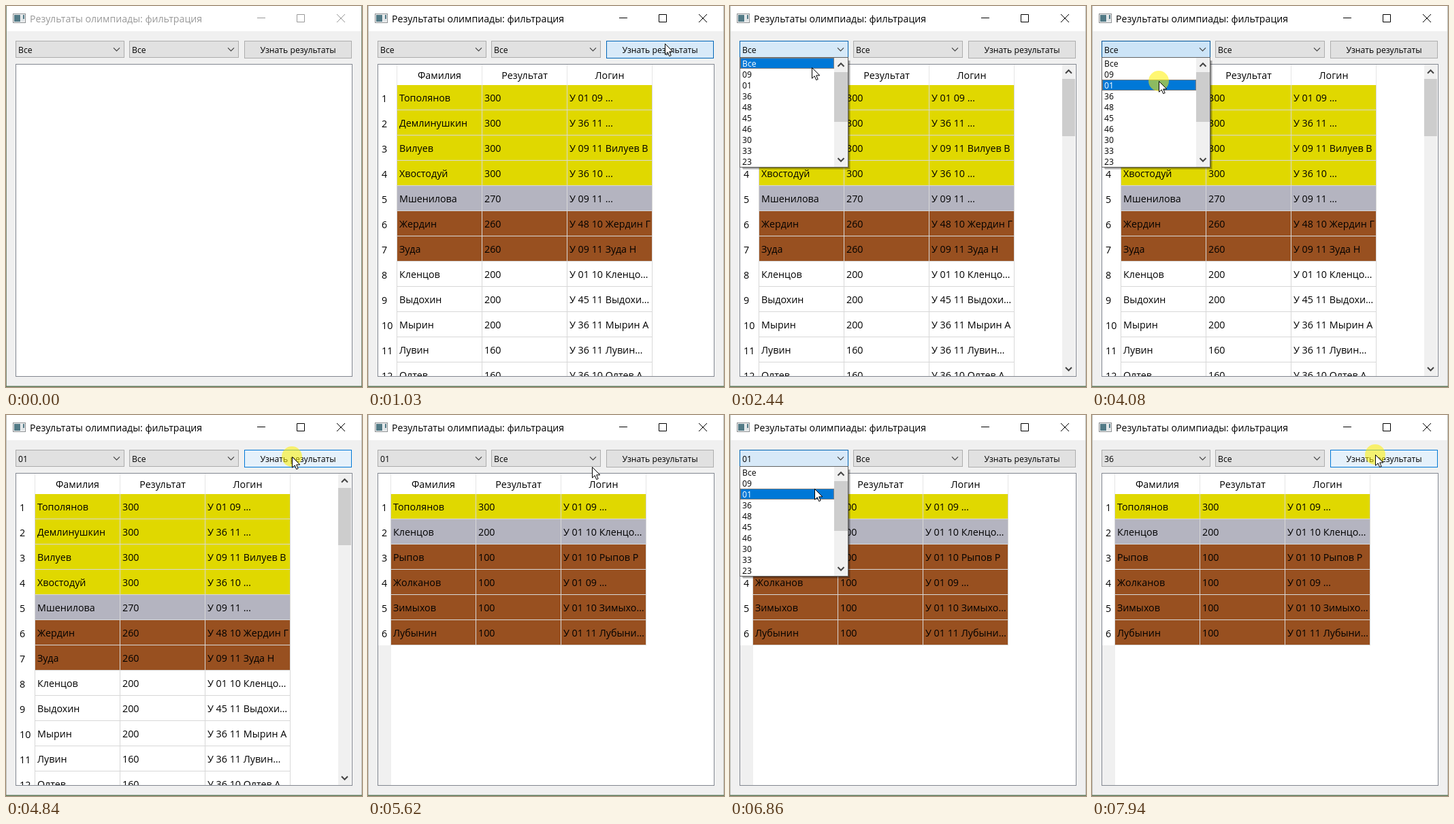
Recreate the animation shown at these times as an HTML page. Size 523 by 559 pixels, loop 8 s.

```html
<!DOCTYPE html>
<html lang="ru">
<head>
<meta charset="utf-8">
<style>
html, body { margin: 0; width: 523px; height: 559px; overflow: hidden; }
svg { display: block; }
text { font: 14.3px "Open Sans", "Noto Sans", sans-serif; white-space: pre; }
.title { font-size: 14.15px; }
.ui { font-size: 12.2px; }
.mid { text-anchor: middle; }
</style>
</head>
<body>
<svg id="stage" width="523" height="559"></svg>
<script>
const LOOP = 8000;
const stage = document.getElementById('stage');
const schools = 'Все 09 01 36 48 45 46 30 33 23'.split(' ');
const medals = ['#e0d800', '#b4b4c0', '#985020'];

// Surname, score, school, grade, initial
const people = `Тополянов 300 01 09
Демлинушкин 300 36 11
Вилуев 300 09 11 В
Хвостодуй 300 36 10
Мшенилова 270 09 11
Жердин 260 48 10 Г
Зуда 260 09 11 Н
Кленцов 200 01 10
Выдохин 200 45 11
Мырин 200 36 11 А
Лувин 160 36 11
Олтев 160 36 10 А
Рыпов 100 01 10 Р
Жолканов 100 01 09
Зимыхов 100 01 10
Лубынин 100 01 11`.split('\n').map(row => {
  const [name, score, school, grade, initial] = row.split(' ');
  const tail = initial ? `${name} ${initial}` : (name.length < 8 ? name.slice(0, 6) : '') + '…';
  return { school, score, cells: [name, score, `У ${school} ${grade} ${tail}`] };
});

const moves = [], presses = [], updates = [];
const move = (from, till, x, y) => moves.push({ from, till, x, y });
const update = (t, change) => updates.push({ t, change });
function press(t, hold, change) {
  presses.push([t, t + hold]);
  update(t + hold, { ...change, released: t + hold });
}

// The session, step by step
move(0, 70, 448, 534);
move(70, 800, 436, 55);
press(970, 60, { shown: 0 });
update(1130, { bar: true });
move(1130, 1730, 164, 61);
press(1890, 100, { open: true });
move(2050, 2440, 120, 90);
move(2640, 3050, 110, 103);
move(3420, 3610, 98, 110);
press(4080, 150, { open: false, school: 2 });
move(4230, 4720, 420, 61);
press(4780, 80, { shown: 2, bar: false });
move(5050, 5620, 329, 76);
move(5640, 5850, 300, 66);
move(5900, 6250, 160, 64);
press(6320, 100, { open: true });
move(6470, 6800, 124, 108);
move(6940, 7030, 120, 128);
press(7090, 80, { open: false, school: 3 });
move(7170, 7540, 272, 111);
move(7600, 7940, 416, 58);
press(7940, 100, {});

function pointer(t) {
  let [{ x, y }] = moves;
  for (const m of moves) {
    if (t < m.from) break;
    const k = Math.min(1, (t - m.from) / (m.till - m.from)), e = k * k * (3 - 2 * k);
    x += (m.x - x) * e;
    y += (m.y - y) * e;
  }
  return [x, y];
}

function stateAt(t) {
  const state = { school: 0, shown: null, open: false, bar: false, released: -LOOP };
  for (const u of updates) if (t >= u.t) Object.assign(state, u.change);
  return state;
}

const rect = (x, y, w, h, fill) =>
  `<rect x="${x}" y="${y}" width="${w}" height="${h}" fill="${fill}"/>`;
const frame = (x, y, w, h, fill, stroke) =>
  `<rect x="${x + .5}" y="${y + .5}" width="${w - 1}" height="${h - 1}" fill="${fill}" stroke="${stroke}"/>`;
const line = (d, color, width = 1) =>
  `<path d="${d}" fill="none" stroke="${color}" stroke-width="${width}"/>`;
const label = (x, y, s, cls = '', fill = '#000') =>
  `<text x="${x}" y="${y}" class="${cls}" fill="${fill}">${s}</text>`;
const chevron = (x, y, dir, width = 1.2) =>
  line(`M${x - 4.5} ${y - 2.2 * dir}l4.5 ${4.5 * dir}l4.5 ${-4.5 * dir}`, '#444', width);

function windowFrame(active) {
  const ink = active ? '#000' : '#999', edge = active ? '#bcc0b9' : '#7c8b76';
  return rect(0, 0, 523, 559, '#f0f0f0') + rect(1, 0, 521, 37, '#fff') +
    rect(0, 0, 1, 558, edge) + rect(522, 0, 1, 558, edge) +
    rect(0, 557.5, 523, 1.5, '#5f7a5a') +
    frame(10, 11, 19, 14, '#f4f4f4', '#8b8f92') + rect(12, 13, 9, 10, '#527a86') +
    rect(22, 13, 5, 10, '#dfe4e6') + rect(25, 13, 2, 6, '#527a86') +
    label(35, 24, 'Результаты олимпиады: фильтрация', 'title', ink) +
    line('M369 17.5h12M427.5 12.5h11v11h-11zM486 12l12 12M498 12l-12 12', ink);
}

function control(x, w, h, hover, glow) {
  return frame(x, 51, w, h, hover ? '#e5f1fb' : '#e1e1e1', hover ? '#0078d7' : '#adadad') +
    (glow > 0 ? `<g opacity="${glow}">${frame(x, 51, w, h, '#cce4f7', '#005499')}</g>` : '');
}

const combo = (x, w, value, hover, glow) =>
  control(x, w, 25, hover, glow) + label(x + 4, 68.5, value, 'ui') + chevron(x + w - 11.5, 63.5, 1);

function scrollbar(x, y, w, h, thumbY, thumbH) {
  const mid = x + w / 2;
  return rect(x, y, w, h, '#f0f0f0') + rect(x, thumbY, w, thumbH, '#cdcdcd') +
    chevron(mid, y + 10.5, -1, 2) + chevron(mid, y + h - 10.5, 1, 2);
}

function table(filter, bar) {
  const rows = people.filter(p => !filter || p.school === schools[filter]);
  const ranks = [...new Set(rows.map(p => p.score))];
  const left = rows.length > 9 ? 28 : 19, width = 125, step = 37;
  let s = rect(0, 30 + rows.length * step, left, 457, '#f0f0f0');
  rows.forEach(({ score, cells }, i) => {
    const y = 30 + i * step;
    s += rect(left, y, width * 3, step, medals[ranks.indexOf(score)] || '#fff') +
      rect(left, y + step - 1, width * 3, 1, '#d8d8d8') + label(5, y + 25, i + 1);
    cells.forEach((v, c) => { s += label(left + width * c + 3, y + 24, v); });
  });
  ['Фамилия', 'Результат', 'Логин', ''].forEach((name, c) => {
    const x = left + width * c - 1;
    s += label(x + width / 2 + .5, 21, name, 'mid') +
      rect(x, 0, 1, 30, '#e5e5e5') + rect(x, 30, 1, rows.length * step, '#d8d8d8');
  });
  if (bar) s += scrollbar(473, 0, 19, 457, 21, 84);
  return `<svg x="15" y="86" width="493" height="457">${s}</svg>`;
}

function popup(active) {
  let s = '';
  for (let i = 1; i < 4; i++)
    s += `<rect x="${16 + i}" y="80" width="158" height="${157 + i}" opacity=".16"/>`;
  s += frame(14, 75, 160, 162, '#fff', '#646464');
  schools.forEach((name, i) => {
    const y = 76 + i * 16, on = i === active;
    if (on) s += rect(15, y, 138, 16, '#0078d7') +
      `<rect x="15.5" y="${y + .5}" width="137" height="15" fill="none" stroke="#ff8728" stroke-dasharray="1"/>`;
    s += label(18, y + 12.8, name, 'ui', on ? '#fff' : '#000');
  });
  return s + scrollbar(153, 76, 20, 160, 97, 73);
}

const cursor = (x, y, pressed) =>
  (pressed ? `<circle cx="${x}" cy="${y}" r="15" fill="#fff000" opacity=".55"/>` : '') +
  `<path transform="translate(${x} ${y})" d="M.5 .5V16.2L4.2 12.8L6.7 18.6L9.2 17.5L6.7 11.9H11.8Z" fill="#fff" stroke="#000"/>`;

function scene(t) {
  const { school, shown, open, bar, released } = stateAt(t);
  const [x, y] = pointer(t);
  const over = (left, w) => !open && x >= left && x < left + w && y >= 51 && y < 75;
  const onButton = over(350, 158), age = t - released;

  let s = windowFrame(t >= 970) +
    combo(14, 160, schools[school], open || over(14, 160), open ? Math.min(1, age / 800) : 0) +
    combo(181, 161, 'Все', over(181, 161), 0) +
    control(350, 158, 26, onButton, onButton ? .5 - age / 500 : 0) +
    label(429, 69, 'Узнать результаты', 'ui mid') +
    frame(14, 85, 495, 459, '#fff', '#828790');
  if (shown !== null) s += table(shown, bar);
  if (open) s += popup(y < 76 ? school : Math.floor((y - 76) / 16));
  if (t >= 70) s += cursor(x, y, presses.some(([a, b]) => t >= a && t < b));
  return s;
}

const start = performance.now();
function tick() {
  stage.innerHTML = scene((performance.now() - start) % LOOP);
  requestAnimationFrame(tick);
}
tick();
</script>
</body>
</html>
```
